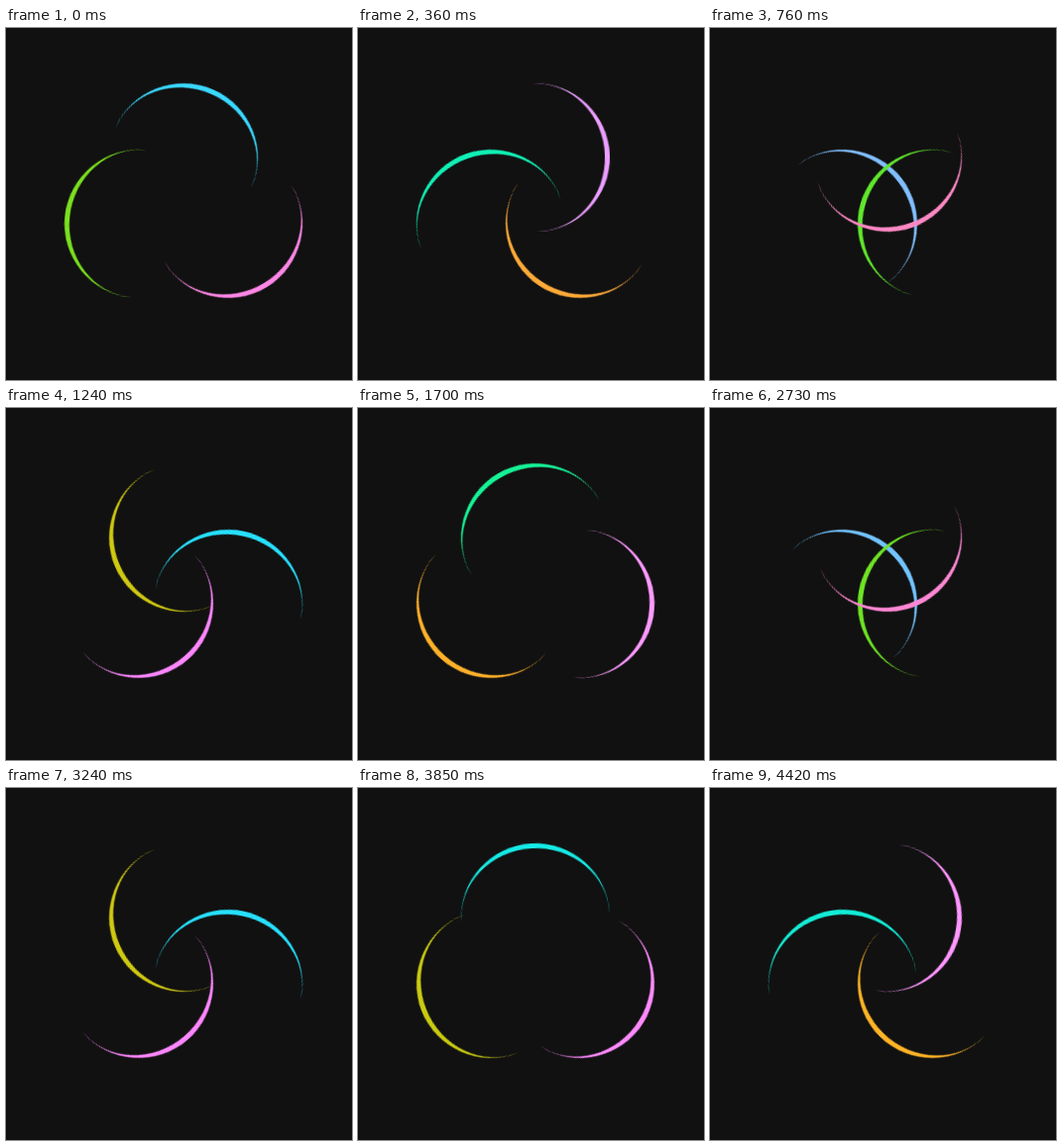
An HTML page for the animation above (4.45 s loop, 349 by 356 pixels).

```html
<!DOCTYPE html>
<html lang="en">
<head>
<meta charset="utf-8">
<title>Three rings</title>
<style>
  html, body {
    margin: 0;
    width: 100%;
    height: 100%;
    overflow: hidden;
    background: #111;
  }

  /* A lone top border on a circle tapers into a crescent. */
  .ring {
    position: absolute;
    left: var(--x);
    top: var(--y);
    box-sizing: border-box;
    width: 150px;
    height: 150px;
    border-top: 5px solid rgb(24, 233, 240);
    border-radius: 50%;
    animation: spin 4450ms linear infinite;
  }

  .left  { --x: 59px;  --y: 123px;    --turn: -84.5deg; }
  .right { --x: 149px; --y: 123px;    --turn: 148.6deg; }
  .top   { --x: 104px; --y: 56.1px; --turn: 23.5deg; }

  /* One turn takes 2 s; the hue follows the angle. */
  @keyframes spin {
    from {
      transform: rotate(var(--turn));
      filter: hue-rotate(var(--turn));
    }
    to {
      transform: rotate(calc(var(--turn) + 801deg));
      filter: hue-rotate(calc(var(--turn) + 801deg));
    }
  }
</style>
</head>
<body>
  <div class="ring left"></div>
  <div class="ring right"></div>
  <div class="ring top"></div>
</body>
</html>
```
